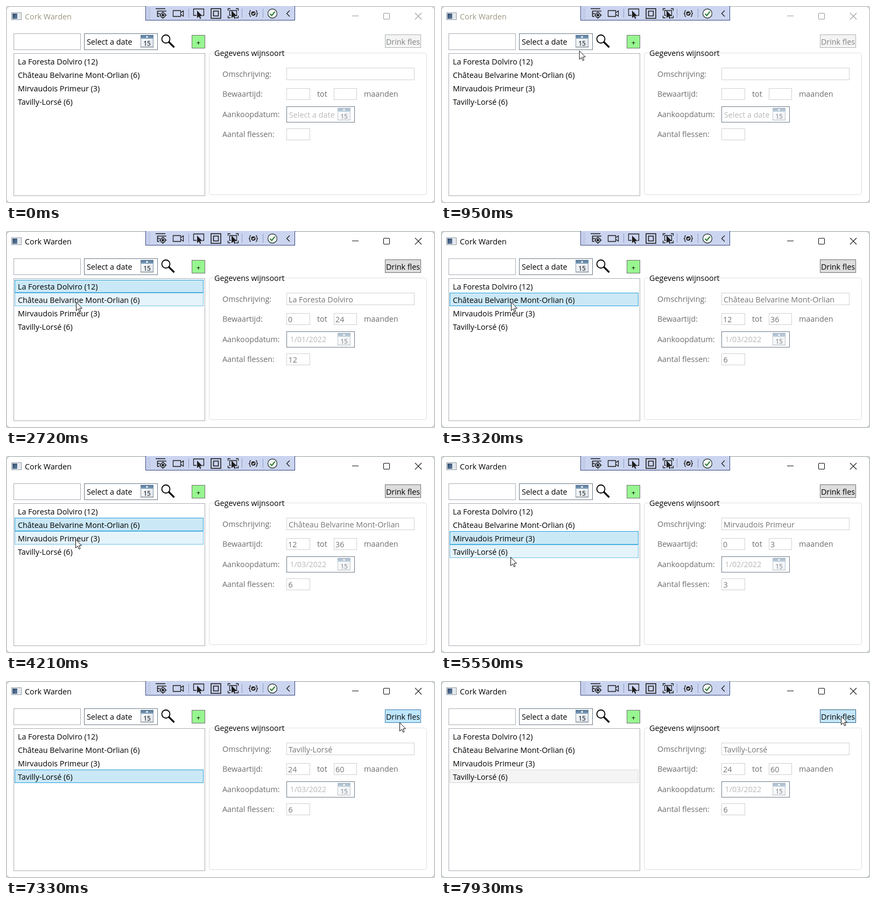
Animation, 797 px wide and 367 px high, one loop 8 s. Source, as an HTML page:

```html
<!DOCTYPE html>
<html lang="nl">
<head>
<meta charset="utf-8">
<title>Cork Warden</title>
<style>
  :root {
    --hover: #e5f3fb; --hover-line: #70c0e7;
    --sel: #cbe8f6; --sel-line: #26a0da;
  }
  html, body { margin: 0; width: 100%; height: 100%; overflow: hidden; background: #d8dcd9; }
  svg { display: block; }
  text { font: 14.3px "Open Sans", "Noto Sans", sans-serif; }
  .anim, .row, .record { animation: 8s step-end infinite; }
  .line { fill: none; stroke: #1e1e1e; stroke-width: 1.3; }
  .box { fill: #fff; stroke: #abadb3; }
  .picker { fill: #fff; stroke: #6d7a86; }
  .dim { fill: #fff; stroke: #cfd0d3; }
  .label text { fill: #6d6d6d; }
  .day { font-size: 12px; font-weight: 600; fill: #39434d; text-anchor: middle; }
  .plus { font-size: 13px; text-anchor: middle; }
  .record { visibility: hidden; }
  .record text { fill: #757575; }
  .record .date, .hint { fill: #b6bab6; }
  .row { fill: transparent; stroke: transparent; }

  /* window activation */
  .frame { stroke: #a8a8a8; animation-name: frame; }
  .title { fill: #9b9780; animation-name: title; }
  .controls { fill: none; stroke: #999; stroke-width: 1.1; animation-name: controls; }
  @keyframes frame { 21.25% { stroke: #8e9a94; } }
  @keyframes title { 21.25% { fill: #000; } }
  @keyframes controls { 21.25% { stroke: #111; } }

  /* list rows: hover, selected, none */
  .r1 { animation-name: row1; }
  .r2 { animation-name: row2; }
  .r3 { animation-name: row3; }
  .r4 { animation-name: row4; }
  @keyframes row1 {
    15.375% { fill: var(--hover); stroke: var(--hover-line); }
    22.125% { fill: var(--sel); stroke: var(--sel-line); }
    41.5% { fill: transparent; stroke: transparent; }
  }
  @keyframes row2 {
    33.125% { fill: var(--hover); stroke: var(--hover-line); }
    41.5% { fill: var(--sel); stroke: var(--sel-line); }
    59.25% { fill: transparent; stroke: transparent; }
  }
  @keyframes row3 {
    50% { fill: var(--hover); stroke: var(--hover-line); }
    59.25% { fill: var(--sel); stroke: var(--sel-line); }
    76.875% { fill: transparent; stroke: transparent; }
    82.875% { fill: var(--hover); stroke: var(--hover-line); }
    85.5% { fill: transparent; stroke: transparent; }
  }
  @keyframes row4 {
    65.125% { fill: var(--hover); stroke: var(--hover-line); }
    76.875% { fill: var(--sel); stroke: var(--sel-line); }
    99.125% { fill: #f4f4f4; stroke: #dadada; }
  }

  /* details of the selected row */
  .hint { animation-name: hint; }
  .d1 { animation-name: details1; }
  .d2 { animation-name: details2; }
  .d3 { animation-name: details3; }
  .d4 { animation-name: details4; }
  @keyframes hint { 22.125%, 100% { visibility: hidden; } }
  @keyframes details1 { 22.125% { visibility: visible; } 41.5% { visibility: hidden; } }
  @keyframes details2 { 41.5% { visibility: visible; } 59.25% { visibility: hidden; } }
  @keyframes details3 { 59.25% { visibility: visible; } 76.875% { visibility: hidden; } }
  @keyframes details4 { 76.875%, 100% { visibility: visible; } }

  /* drink button */
  .button { fill: #f4f4f4; stroke: #adb2b5; animation-name: button; }
  .caption { fill: #838383; text-anchor: middle; animation-name: caption; }
  @keyframes button {
    22.125% { fill: #ddd; stroke: #707070; }
    91.625% { fill: #bee6fd; stroke: #3c7fb1; }
    99.125% { fill: #c4e5f6; stroke: #2c628b; }
  }
  @keyframes caption { 22.125% { fill: #000; } }

  /* pointer */
  .pointer { animation: move 8s infinite; }
  .ring { fill: #fdf04c; opacity: 0; animation-name: ring; }
  @keyframes ring {
    21.25%, 40.625%, 58.375%, 76%, 98.25% { opacity: .8; }
    22.125%, 41.5%, 59.25%, 76.875%, 99.125% { opacity: 0; }
  }
  @keyframes move {
    0% { transform: translate(-60px, 0); animation-timing-function: step-end; }
    5.75% { transform: translate(628px, 339px); animation-timing-function: steps(2); }
    7.5% { transform: translate(540px, 230px); animation-timing-function: steps(2); }
    9.25% { transform: translate(430px, 130px); animation-timing-function: steps(2); }
    11% { transform: translate(310px, 84px); animation-timing-function: steps(3); }
    13.625% { transform: translate(150px, 81px); animation-timing-function: steps(2); }
    15.375% { transform: translate(117px, 93px); animation-timing-function: step-end; }
    16.25%, 21.25% { transform: translate(116px, 94px); animation-timing-function: steps(4); }
    24.75%, 30.5% { transform: translate(116px, 97px); animation-timing-function: steps(4); }
    34%, 48.25% { transform: translate(130px, 132px); animation-timing-function: steps(5); }
    52.625%, 63.375% { transform: translate(129px, 155px); animation-timing-function: steps(4); }
    66.875% { transform: translate(129px, 190px); animation-timing-function: step-end; }
    69.375%, 80.25% { transform: translate(129px, 188px); animation-timing-function: steps(5); }
    84.625% { transform: translate(372px, 147px); animation-timing-function: steps(7); }
    90.75% { transform: translate(725px, 83px); animation-timing-function: steps(3); }
    93.375%, 100% { transform: translate(743px, 65px); }
  }
</style>
</head>
<body>
<svg width="797" height="367" viewBox="0 0 797 367">
  <defs>
    <linearGradient id="sky" x2="0" y2="1">
      <stop stop-color="#4f7193"/><stop offset="1" stop-color="#86a5c0"/>
    </linearGradient>
    <linearGradient id="paper" x2="1" y2="1">
      <stop stop-color="#fff"/><stop offset="1" stop-color="#dfe3e8"/>
    </linearGradient>
    <linearGradient id="pane" x2="1" y2="1">
      <stop stop-color="#2f4a6b"/><stop offset="1" stop-color="#6683a3"/>
    </linearGradient>
    <g id="calendar">
      <rect x=".5" y=".5" width="23" height="22" fill="url(#paper)" stroke="#8796a5"/>
      <rect width="24" height="7" fill="url(#sky)"/>
      <rect x="10.500" y="2" width="3" height="3" fill="#fff"/>
      <path d="M0 22.500H24" stroke="#5c6b79"/>
      <text class="day" x="12" y="19.500">15</text>
    </g>
    <path id="arrow" d="M0 0V14L3.500 11 5.500 15.500 7.500 14.600 5.500 10.200H10Z" fill="#1e1e1e"/>
  </defs>

  <rect class="frame anim" x=".5" y=".5" width="796" height="366" rx="8" fill="#fff"/>

  <!-- title bar -->
  <rect x="10.5" y="12.5" width="18" height="13" fill="#f3f5f7" stroke="#8a949e"/>
  <rect x="12" y="14" width="9" height="10" fill="url(#pane)"/>
  <rect x="22" y="14" width="5" height="10" fill="#e3e8ed"/>
  <text class="title anim" x="35" y="24.5">Cork Warden</text>
  <g class="controls anim">
    <path d="M643 18.5H655M760 13L772 25M772 13L760 25"/>
    <rect x="701.5" y="13.5" width="11" height="11" rx="1.5"/>
  </g>

  <!-- debug toolbar -->
  <rect x="259.5" y="-.5" width="277" height="27" fill="#ccd5f0" stroke="#34457f"/>
  <path d="M263.5 3V24M267.5 3V24" stroke="#7d88ae" stroke-dasharray="1 3"/>
  <path d="M265.5 5V24" stroke="#7d88ae" stroke-dasharray="1 3"/>
  <path d="M339.5 5V22M438.5 5V22M477.5 5V22" stroke="#8f9bc4"/>
  <g class="line">
    <path d="M278 5H296M281 9.5H298M281.500 9V19.500H285M281 14H286" stroke-width="1.6"/>
    <circle cx="291.5" cy="17" r="4.5" stroke-width="1.6"/>
    <path d="M291.5 10.5V13M291.5 21V24M285 17H287M296 17H298.5"/>
    <circle cx="291.5" cy="17" r="1.8" fill="#1e1e1e"/>
    <path d="M310.5 8.5H324.5V19.5H310.5ZM324.5 12.5L329.5 9V19L324.5 15.5"/>
    <path d="M354 17.5H348.5V5.5H367.5V17.5H365"/>
    <rect x="381" y="5" width="18" height="18" stroke-width="1.6"/>
    <rect x="385.5" y="9.5" width="9" height="9" stroke-width="1.6"/>
    <path d="M412.5 9V5H417M427 5H431.5V9M412.5 18V22H417M427 22H431.5V18M418 17.5H415.500V8.500H428.500V17.500H427"/>
    <path d="M455 8.5Q452.5 8.5 453 11T451 14Q453 14 453 17T455 19.5M464 8.5Q466.5 8.5 466 11T468 14Q466 14 466 17T464 19.5"/>
    <circle cx="459.5" cy="14" r="4" fill="#1e1e1e" stroke="none"/>
    <path d="M457.5 14L459 15.5 461.7 12.5" stroke="#fff"/>
    <circle cx="495" cy="14" r="8.5" fill="#f4f8f4" stroke="#2b3a35"/>
    <path d="M490.5 14.5L493.7 17.7 499.5 10.5" stroke="#2f7d3a" stroke-width="2"/>
    <path d="M527 8.5L521.5 14 527 19.5"/>
  </g>
  <use href="#arrow" x="355" y="8.5"/>
  <use href="#arrow" x="419" y="8.5"/>

  <!-- search row -->
  <rect class="box" x="14.5" y="51.5" width="124" height="30"/>
  <rect class="picker" x="145.5" y="51.5" width="136" height="30"/>
  <text x="150" y="71.5">Select a date</text>
  <use href="#calendar" x="250" y="54"/>
  <circle cx="297" cy="61.5" r="7.5" fill="#fff" stroke="#000" stroke-width="1.8"/>
  <path d="M302.5 67L312.5 77" stroke="#000" stroke-width="3.2"/>
  <rect x="345.5" y="54.5" width="24" height="24" fill="#98f690" stroke="#707070"/>
  <text class="plus" x="357.5" y="72.5">+</text>
  <rect class="button anim" x="704.5" y="53.5" width="66" height="24"/>
  <text class="caption anim" x="737.5" y="71.5">Drink fles</text>

  <!-- list -->
  <rect class="box" x="14.5" y="88.5" width="355" height="265"/>
  <rect class="row r1" x="16.5" y="91.5" width="350" height="23"/>
  <rect class="row r2" x="16.5" y="115.5" width="350" height="24"/>
  <rect class="row r3" x="16.5" y="140.5" width="350" height="24"/>
  <rect class="row r4" x="16.5" y="165.5" width="350" height="24"/>
  <text x="22" y="108.5">La Foresta Dolviro (12)</text>
  <text x="22" y="133.5">Château Belvarine Mont-Orlian (6)</text>
  <text x="22" y="158.5">Mirvaudois Primeur (3)</text>
  <text x="22" y="183.5">Tavilly-Lorsé (6)</text>

  <!-- details -->
  <rect x="377.5" y="87.5" width="404" height="264" rx="4" fill="none" stroke="#dcdfe0"/>
  <path d="M384 87.5H519" stroke="#fff" stroke-width="3"/>
  <text x="387" y="93">Gegevens wijnsoort</text>
  <g class="label">
    <text x="402" y="132">Omschrijving:</text>
    <text x="402" y="169">Bewaartijd:</text>
    <text x="578" y="169">tot</text>
    <text x="665" y="169">maanden</text>
    <text x="402" y="207">Aankoopdatum:</text>
    <text x="402" y="244">Aantal flessen:</text>
  </g>
  <g class="dim">
    <rect x="521.5" y="115.5" width="237" height="22"/>
    <rect x="521.5" y="153.5" width="43" height="21"/>
    <rect x="609.5" y="153.5" width="42" height="21"/>
    <rect x="521.5" y="228.5" width="43" height="21"/>
  </g>
  <rect class="picker" x="521.5" y="187.5" width="126" height="29"/>
  <use href="#calendar" x="616" y="190" opacity=".5"/>
  <text class="hint anim" x="526" y="207.5">Select a date</text>

  <g class="record d1">
    <text x="525" y="132.5">La Foresta Dolviro</text>
    <text x="524" y="169.5">0</text><text x="612" y="169.5">24</text>
    <text class="date" x="527.5" y="207">1/01/2022</text>
    <text x="524.5" y="244.5">12</text>
  </g>
  <g class="record d2">
    <text x="525" y="132.5">Château Belvarine Mont-Orlian</text>
    <text x="524" y="169.5">12</text><text x="612" y="169.5">36</text>
    <text class="date" x="527.5" y="207">1/03/2022</text>
    <text x="524.5" y="244.5">6</text>
  </g>
  <g class="record d3">
    <text x="525" y="132.5">Mirvaudois Primeur</text>
    <text x="524" y="169.5">0</text><text x="612" y="169.5">3</text>
    <text class="date" x="527.5" y="207">1/02/2022</text>
    <text x="524.5" y="244.5">3</text>
  </g>
  <g class="record d4">
    <text x="525" y="132.5">Tavilly-Lorsé</text>
    <text x="524" y="169.5">24</text><text x="612" y="169.5">60</text>
    <text class="date" x="527.5" y="207">1/03/2022</text>
    <text x="524.5" y="244.5">6</text>
  </g>

  <g class="pointer">
    <circle class="ring anim" r="15"/>
    <path d="M.5 .5V16.5L4.2 13 6.7 18.5 9 17.5 6.6 12H11.5Z" fill="#fff" stroke="#111"/>
  </g>
</svg>
</body>
</html>
```
